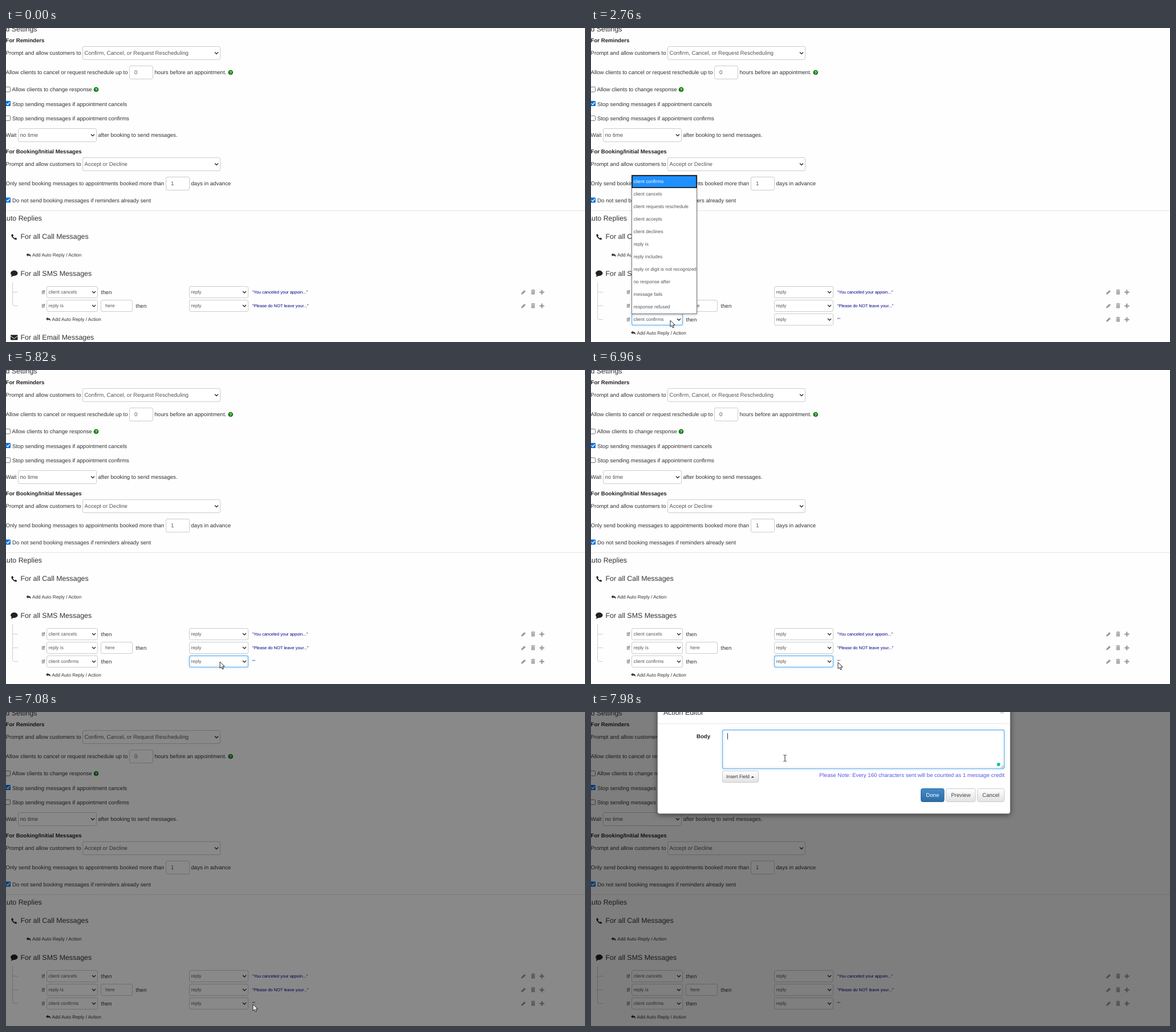
An HTML page that plays this animation: 1015 by 551 pixels, repeating every 8000 ms.

```html
<!DOCTYPE html>
<html lang="en">
<head>
<meta charset="utf-8">
<title>Auto replies</title>
<style>
html, body { margin: 0; width: 100%; height: 100%; overflow: hidden; background: #fefefe; }
body { position: relative; font-family: "Liberation Sans", Arial, sans-serif; }
svg, #backdrop { position: absolute; left: 0; top: 0; width: 1015px; height: 551px; }
text { text-rendering: geometricPrecision; white-space: pre; }
#backdrop { background: #000; }
.glow { fill: none; stroke: #66afe9; filter: drop-shadow(0 0 2px rgba(82, 168, 236, .8)); }
.menu { position: absolute; }
.menu svg { width: 100%; height: 100%; }
#modalBox { filter: drop-shadow(0 2px 5px rgba(0, 0, 0, .5)); }
</style>
</head>
<body>
<svg id="page" viewBox="0 0 1015 551"></svg>
<div id="menu1" class="menu"></div>
<div id="menu2" class="menu"></div>
<div id="backdrop"></div>
<svg id="modal" viewBox="0 0 1015 551"></svg>
<svg id="pointer" viewBox="0 0 1015 551">
  <path id="arrow" d="M0 0V11.300L2.600 8.900L4.400 13L6.300 12.200L4.600 8.200H8.200Z" fill="#fff" stroke="#111" stroke-width=".9"/>
  <path id="hand" d="M2.600 7V1.200Q2.600 0 3.600 0T4.600 1.200V4.800Q6 4 6.600 5.200Q8 4.500 8.500 5.700Q10.400 5.300 10.400 7V9.500Q10.400 11 9.400 12.200V14H4V12.600L.5 8.600Q-.2 7.300 1 7Q1.700 6.900 2.600 8Z" fill="#fff" stroke="#111" stroke-width=".9"/>
  <path id="beam" d="M-2.500 -5.500Q0 -5.500 0 -4.500Q0 -5.500 2.500 -5.500M0 -4.500V4.500M-2.500 5.500Q0 5.500 0 4.500Q0 5.500 2.500 5.500" fill="none" stroke="#222"/>
</svg>
<script>
const $ = id => document.getElementById(id);
const BODY = 9.63, SMALL = 8.3, HEAD = 12.4, QUOTE = 7.5;
const GREY = '#555';

// Text is placed by its vertical centre.
const text = (x, cy, s, size = BODY, fill = '#333', more = '') =>
  `<text x="${x}" y="${cy + size * .36}" font-size="${size}" fill="${fill}" ${more}>${s}</text>`;
const bold = (x, cy, s) => text(x, cy, s, BODY, '#222', 'font-weight="bold"');
const rect = (x, y, w, h, more) => `<rect x="${x}" y="${y}" width="${w}" height="${h}" ${more}/>`;
const path = (d, more = '') => `<path d="${d}" ${more}/>`;
const at = (x, y, inner, more = '') => `<g transform="translate(${x} ${y})" ${more}>${inner}</g>`;

const input = (x, cy, w, h, s, size = BODY, pad = 9) =>
  rect(x + .5, cy - h / 2 + .5, w - 1, h - 1, 'rx="2.5" fill="#fff" stroke="#ccc"') +
  text(x + pad, cy, s, size, GREY);
const select = (x, cy, w, h, s, size = BODY) => input(x, cy, w, h, s, size, 3.5) +
  path(`M${x + w - 10} ${cy - 1.5}l3 3l3-3`, 'fill="none" stroke="#333" stroke-width="1.5"');
const checkbox = (cy, on) => on
  ? rect(-1, cy - 5, 9, 9, 'rx="1.3" fill="#0a70e0"') +
    path(`M1 ${cy - .6}l2 2.200l3.600-4.400`, 'fill="none" stroke="#fff" stroke-width="1.400"')
  : rect(-1.5, cy - 4.5, 9, 8.5, 'rx="1.300" fill="#fff" stroke="#767676"');
const help = (x, cy) => `<circle cx="${x}" cy="${cy}" r="4.300" fill="#0a7d0a"/>` +
  text(x, cy, '?', 7.5, '#fff', 'font-weight="bold" text-anchor="middle"');

const addLink = (x, cy) =>
  at(x, cy - 3.5, path('M0 3L3.400 0V1.800C7.500 1.800 8.800 3.800 7.200 7.200C7.400 5 6 4.200 3.400 4.200V6Z', 'fill="#333"')) +
  text(x + 10.5, cy, 'Add Auto Reply / Action', 8.25);

const tools = cy => at(0, cy,
  path('M903 4L903.600 1.500L908.700-3.600L911-1.300L905.900 3.400Z') +
  path('M920.500-4h7v1.300h-7zM921-2h6v6h-6zM923-4.700h2v1h-2z') +
  path('M938.300-4h2.200v3h3v2.200h-3v3h-2.200v-3h-3v-2.200h3z'), 'fill="#999"') +
  path(`M922.500 ${cy - 1}v4M924 ${cy - 1}v4M925.500 ${cy - 1}v4`, 'stroke="#fff" stroke-width=".4"');

const row = (cy, cond, quote, word) =>
  text(62.5, cy, 'If') + select(71, cy, 90, 21, cond, SMALL) +
  (word ? input(166, cy, 56, 21, word, SMALL, 8) : '') +
  text(word ? 227.500 : 166.500, cy, 'then') +
  select(321, cy, 104, 21, 'reply', SMALL) +
  text(431.5, cy, `"${quote}"`, QUOTE, '#00008b') + tools(cy);

const tree = last => {
  let d = `M11.500 446V${last - 3}q0 3 3 3h6.500`;
  for (let y = 463.5; y < last; y += 24) d += `M11.500 ${y}h9.500`;
  return d;
};

$('page').innerHTML =
  text(54.5, 1.5, 'd Settings', HEAD, '#333', 'text-anchor="end"') +
  bold(-.5, 22, 'For Reminders') +
  text(-.5, 44, 'Prompt and allow customers to') +
  select(134, 44, 242, 24, 'Confirm, Cancel, or Request Rescheduling') +
  text(-.5, 78, 'Allow clients to cancel or request reschedule up to') +
  input(216, 78, 42, 24, '0') +
  text(260.5, 78, 'hours before an appointment.') + help(393.700, 78) +
  checkbox(108, false) + text(10.5, 108, 'Allow clients to change response') + help(158, 108) +
  checkbox(133, true) + text(11, 133.5, 'Stop sending messages if appointment cancels') +
  checkbox(158.5, false) + text(11, 159, 'Stop sending messages if appointment confirms') +
  text(-.5, 188, 'Wait') + select(21, 188, 138, 24, 'no time') +
  text(161.5, 188, 'after booking to send messages.') +
  bold(-.5, 217, 'For Booking/Initial Messages') +
  text(-.5, 239, 'Prompt and allow customers to') +
  select(134, 239, 242, 24, 'Accept or Decline') +
  text(-.5, 273, 'Only send booking messages to appointments booked more than') +
  input(280, 273, 42, 24, '1') + text(324.5, 273, 'days in advance') +
  checkbox(302.5, true) + text(11, 303, 'Do not send booking messages if reminders already sent') +
  rect(0, 320, 1015, 1, 'fill="#e4e4e4"') +
  text(63, 334, 'Auto Replies', HEAD, '#333', 'text-anchor="end"') +
  path('M11 361.300C8.500 363 9 365.500 12.300 368.700S18 372.300 19.400 369.900L17 367.800L15.400 368.900C14 368.400 12.500 366.900 12.100 365.500L13.300 364Z', 'fill="#222"') +
  text(25.5, 366, 'For all Call Messages', HEAD) + addLink(35.5, 398.5) +
  '<ellipse cx="14.300" cy="430.300" rx="6.200" ry="4.700" fill="#222"/>' +
  path('M10 432L9 437L14.500 434Z', 'fill="#222"') +
  text(25.5, 430.5, 'For all SMS Messages', HEAD) +
  path('', 'id="tree" fill="none" stroke="#ccc"') +
  row(463.5, 'client cancels', 'You canceled your appoin...') +
  row(487.5, 'reply is', 'Please do NOT leave your...', 'here') +
  `<g id="newRow">${row(511.5, 'client confirms', '')}</g>` +
  rect(71.5, 501.5, 89, 20, 'id="focus1" class="glow" rx="2.500"') +
  rect(321.5, 501.5, 103, 20, 'id="focus2" class="glow" rx="2.500"') +
  '<g id="tail">' + rect(63.5, 502, 110, 18, 'id="hover" rx="2.500" fill="#e6e6e6"') +
  addLink(70, 511) +
  rect(8, 538.5, 12.5, 9, 'rx="1" fill="#222"') +
  path('M8 540.500L14.200 545L20.500 540.500', 'fill="none" stroke="#fff"') +
  text(25.5, 542.5, 'For all Email Messages', HEAD) + '</g>';

// Drop-down lists: an outer shadow plus contents that fade in.
function buildMenu(id, x, y, w, items) {
  const box = $(id), h = items.length * 22 + 2;
  Object.assign(box.style, { left: x + 'px', top: y + 'px', width: w + 'px', height: h + 'px' });
  box.innerHTML = `<svg viewBox="0 0 ${w} ${h}">` +
    rect(.5, .5, w - 1, h - 1, 'fill="#fff" stroke="#767676"') +
    rect(1, 1, w - 2, 21, 'fill="#1e90ff" stroke="#101010" stroke-width="1.600"') +
    items.map((s, i) => text(3.5, 11.3 + i * 22, s, SMALL, i ? GREY : '#fff')).join('') + '</svg>';
}
buildMenu('menu1', 71, 258, 115, ['client confirms', 'client cancels', 'client requests reschedule',
  'client accepts', 'client declines', 'reply is', 'reply includes',
  'reply or digit is not recognized', 'no response after', 'message fails', 'response refused']);
buildMenu('menu2', 321, 236, 120, ['reply', 'opt in to reminders', 'opt out of reminders',
  'opt into marketing messages', 'opt out of marketing messages', 'send email notification',
  'do nothing', 'mark as confirmed', 'mark as canceled', 'mark as reschedule needed',
  'mark as accepted', 'mark as declined']);

const button = (x, y, w, h, label, fill, stroke, color) =>
  rect(x + .5, y + .5, w - 1, h - 1, `rx="3" fill="url(#${fill})" stroke="${stroke}"`) +
  text(x + w / 2, y + h / 2, label, BODY, color, 'text-anchor="middle"');
const gradient = (id, a, b) => `<linearGradient id="${id}" x2="0" y2="1">` +
  `<stop stop-color="${a}"/><stop offset="1" stop-color="${b}"/></linearGradient>`;

$('modal').innerHTML =
  `<defs>${gradient('blue', '#428bca', '#2d6ca2')}${gradient('pale', '#fff', '#e2e2e2')}</defs>` +
  rect(116.5, -20, 618.5, 198.5, 'id="modalBox" rx="4" fill="#fff" stroke="#666" stroke-width=".6"') +
  text(127, .8, 'Action Editor', HEAD) +
  text(720.5, -1, '×', 13, '#bbb', 'font-weight="bold" text-anchor="middle"') +
  rect(117, 20, 618, 1, 'fill="#e5e5e5"') + bold(185, 43, 'Body') +
  rect(230.5, 31.5, 494, 68, 'rx="2.500" fill="#fff" stroke="#bbb"') +
  path('M718 98.500l5.500-5.500M721 98.500l2.500-2.500', 'stroke="#777" stroke-width=".8"') +
  '<g id="focus3">' + rect(230.5, 31.5, 494, 68, 'class="glow" rx="2.500"') +
  rect(239, 37, 1, 11, 'fill="#333"') +
  '<circle cx="714.500" cy="92" r="3" fill="#15c39a"/></g>' +
  rect(230.5, 103.5, 63, 20, 'rx="2.500" fill="url(#pale)" stroke="#ccc"') +
  text(237, 113.5, 'Insert Field', 8.25) + path('M280.500 115.300l2.700-2.900l2.700 2.900z', 'fill="#333"') +
  text(725, 110.5, 'Please Note: Every 160 characters sent will be counted as 1 message credit',
    BODY, '#5757e6', 'text-anchor="end"') +
  button(578, 134, 41.5, 24, 'Done', 'blue', '#2b669a', '#fff') +
  button(622, 134, 52.5, 24, 'Preview', 'pale', '#ccc', '#444') +
  button(677, 134, 48, 24, 'Cancel', 'pale', '#ccc', '#444');

// Pointer track: time, x, y
const track = [
  [240, 984, 52], [300, 724, 246], [360, 587, 324], [420, 542, 353], [480, 452, 401],
  [540, 294, 473], [600, 206, 508], [660, 192, 517], [720, 183, 519], [1020, 157, 517],
  [1080, 145, 514], [1200, 139, 513], [3780, 139, 513], [3960, 160, 510], [4140, 217, 508],
  [4380, 302, 508], [4620, 376, 511], [4980, 376, 511], [5100, 375, 512], [6120, 375, 512],
  [6300, 390, 515], [6540, 425, 516], [6720, 433, 513], [7080, 433, 513], [7200, 435, 452],
  [7260, 430, 370], [7320, 418, 255], [7380, 402, 165], [7440, 380, 140], [7500, 362, 118],
  [7560, 351, 100], [7620, 344, 88], [7740, 340, 81], [8000, 340, 81]
];
function pointerAt(t) {
  const i = track.findIndex(p => p[0] > t);
  const [a, x0, y0] = track[i - 1], [b, x1, y1] = track[i];
  const k = (t - a) / (b - a);
  return [x0 + (x1 - x0) * k, y0 + (y1 - y0) * k];
}

const clamp = v => Math.max(0, Math.min(1, v));
const ramp = (t, from, length) => clamp((t - from) / length);
const fade = (id, v) => { $(id).style.opacity = v; };

function drawMenu(id, t, open, close) {
  const box = $(id), k = ramp(t, open, 120);
  box.style.display = t >= open && t < close ? '' : 'none';
  box.style.boxShadow = k < 1 ? '0 1px 8px rgba(0,0,0,.32)' : '0 1px 4px rgba(0,0,0,.22)';
  box.firstChild.style.opacity = k;
}

function drawPointer(t) {
  const shape = t < 240 ? '' : t >= 1080 && t < 2160 ? 'hand' : t >= 7580 ? 'beam' : 'arrow';
  for (const id of ['arrow', 'hand', 'beam']) $(id).style.display = id === shape ? '' : 'none';
  if (!shape) return;
  const [x, y] = pointerAt(t);
  $(shape).setAttribute('transform', `translate(${Math.round(x)} ${Math.round(y)})`);
}

function draw(t) {
  const added = t >= 1740;
  $('tree').setAttribute('d', tree(added ? 511.5 : 487.5));
  $('tail').setAttribute('transform', `translate(0 ${added ? 24 : 0})`);
  fade('newRow', ramp(t, 1680, 120));
  fade('hover', ramp(t, 1020, 180) - ramp(t, 1680, 180));
  fade('focus1', ramp(t, 2580, 180) - ramp(t, 4680, 180));
  fade('focus2', t < 7020 ? ramp(t, 4680, 180) : 0);
  fade('focus3', ramp(t, 7740, 240));
  fade('backdrop', .5 * ramp(t, 6960, 130));
  fade('modal', ramp(t, 7110, 140));
  drawMenu('menu1', t, 2640, 3540);
  drawMenu('menu2', t, 4680, 5820);
  drawPointer(t);
}

const LOOP = 8000, STEP = 60, start = performance.now();
function tick() {
  const t = (performance.now() - start) % LOOP;
  draw(Math.floor(t / STEP) * STEP);
  requestAnimationFrame(tick);
}
tick();
</script>
</body>
</html>
```
